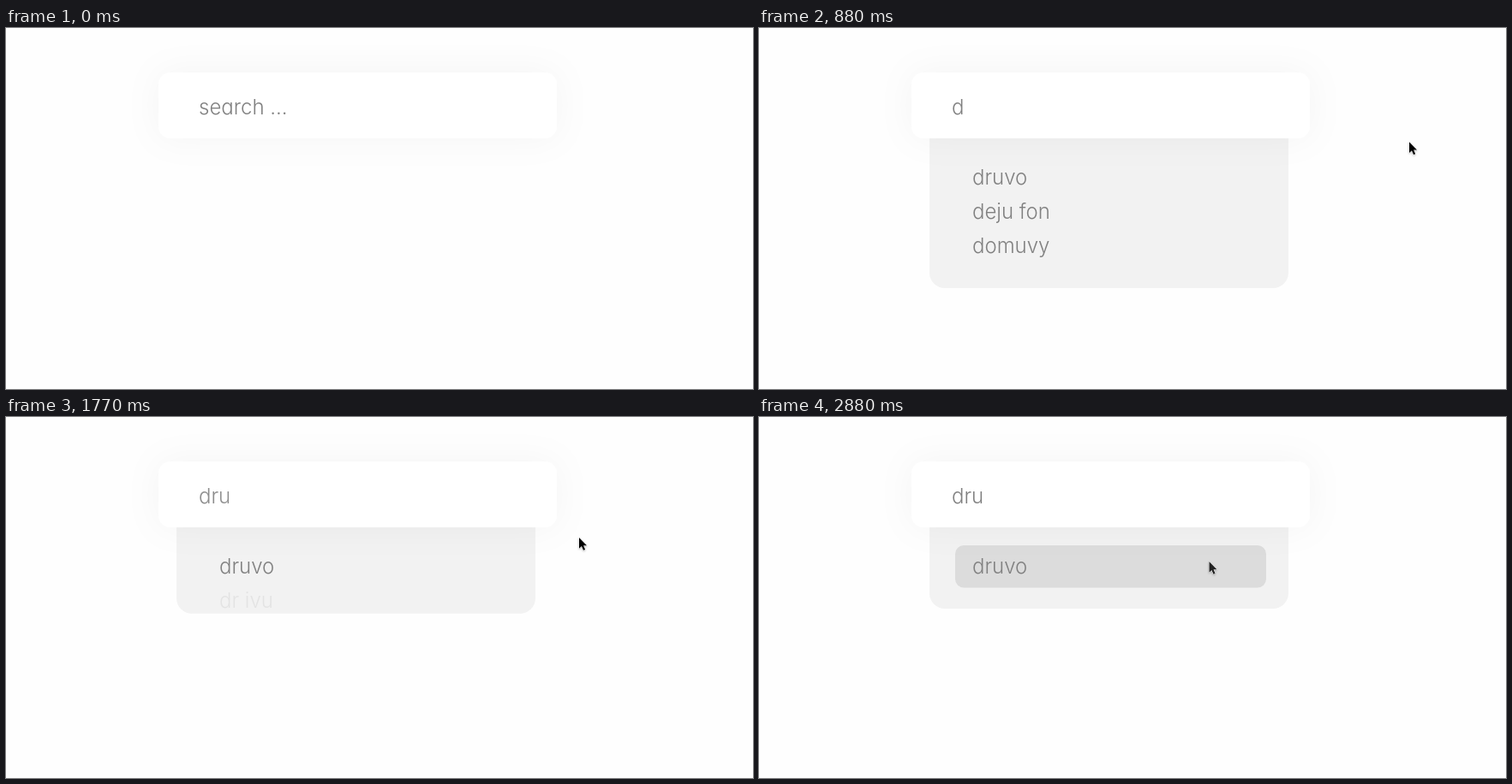
Animation, 872 px wide and 422 px high, one loop 4.01 s. Source, as an HTML page:

```html
<!DOCTYPE html>
<html lang="en">
<head>
<meta charset="utf-8">
<title>Search suggestions</title>
<style>
  html, body { margin: 0; width: 100%; height: 100%; overflow: hidden; background: #fefefe; }
  svg { display: block; }
  text {
    font: 300 24px Inter, "Open Sans", sans-serif;
    font-feature-settings: "cv11";
    fill: #808080;
    white-space: pre;
  }
  #box { filter: drop-shadow(0 0 20px rgba(0, 0, 0, .04)); }
  #cursor { filter: drop-shadow(0 1px 1px rgba(0, 0, 0, .25)); }
</style>
</head>
<body>
<svg width="872" height="422" viewBox="0 0 872 422">
  <rect id="panel" x="199" y="100" width="419" height="0" rx="18" fill="#f2f2f2"/>
  <rect id="hover" x="229" y="150" width="363" height="49.5" rx="10" fill="#dcdcdc"/>
  <rect id="box" x="178" y="52" width="465" height="77" rx="14" fill="#fff"/>
  <g id="labels"></g>
  <path id="cursor" d="M0 0V12.8L2.9 10L5 14.8L7.1 13.9L5.1 9.2H9Z"
        stroke="#fff" paint-order="stroke"/>
</svg>
<script>
const LOOP = 4010, TICK = 70, ROW = 40;
const SHOW = 200, PRESS = 2880;
const $ = id => document.getElementById(id);

// typed text, then its suggestions
const STAGES = [
  { at: -LOOP, lines: ["search ..."] },
  { at: 470, lines: ["d", "druvo", "deju fon", "domuvy"] },
  { at: 1220, lines: ["dr", "druvo", "dr ivu"] },
  { at: 1630, lines: ["dru", "druvo"] }
];

// the picture moves on in ticks within these bursts and rests between them
const BURSTS = [[470, 1020], [1220, 1360], [1630, 1770], [2240, 2670], [2810, PRESS]];

const GLIDES = [
  { from: 610, to: 1020, x: 669, y: 141 },
  { from: 2170, to: 2670, x: 528, y: 168 },
  { from: 2670, to: PRESS, x: 525.5, y: 169 }
];

const clamp = p => Math.max(0, Math.min(1, p));
const lerp = (a, b, p) => a + (b - a) * p;
const progress = (t, from, to) => clamp((t - from) / (to - from));
const smooth = p => p * p * (3 - 2 * p);
const ticks = (t, start) => t < start ? 0 : (t - start) / TICK + 1;

function fade(t, start) {
  const k = ticks(t, start);
  return k > 3.5 ? 1 : 1 - .5 ** k;
}

function heldTime(t) {
  const burst = BURSTS.findLast(b => b[0] <= t);
  if (!burst) return 0;
  const [start, end] = burst;
  if (t >= end) return end;
  const last = Math.round((end - start) / TICK) - 1;
  return start + TICK * Math.min(Math.floor((t - start) / TICK), last);
}

function addLabel(text, row, from) {
  const el = document.createElementNS("http://www.w3.org/2000/svg", "text");
  el.textContent = text;
  el.setAttribute("x", row ? 249 : 225);
  el.setAttribute("y", row ? 143 + ROW * row : 101);
  $("labels").append(el);
  return { el, text, from, to: LOOP };
}

// a line that stays the same keeps its label; others cross-fade
function buildLabels() {
  const all = [], current = [];
  for (const { at, lines } of STAGES) {
    for (let row = 0; row < 4; row++) {
      const old = current[row], text = lines[row];
      if (old && old.text === text) continue;
      if (old) old.to = at;
      current[row] = text && addLabel(text, row, at);
      if (text) all.push(current[row]);
    }
  }
  return all;
}

const labels = buildLabels();

function draw(time) {
  const t = heldTime(time);

  let rows = 0;
  for (const { at, lines } of STAGES)
    rows = lerp(rows, lines.length - 1, clamp(.285 * ticks(t, at)));
  $("panel").setAttribute("height", 84 + ROW * rows);
  $("panel").setAttribute("opacity", rows > 0 ? 1 : 0);
  $("hover").setAttribute("opacity", progress(t, 2530, PRESS) ** 2);

  for (const { el, from, to } of labels)
    el.setAttribute("opacity", fade(t, from) * (1 - fade(t, to)));

  let x = 856, y = 125;
  for (const g of GLIDES) {
    const p = smooth(progress(t, g.from, g.to));
    x = lerp(x, g.x, p);
    y = lerp(y, g.y, p);
  }
  const cursor = $("cursor");
  cursor.setAttribute("transform", `translate(${x} ${y})`);
  cursor.setAttribute("opacity", time < SHOW ? 0 : 1);
  cursor.setAttribute("fill", t < PRESS ? "#000" : "#222");
}

const begin = performance.now();
function loop() {
  draw((performance.now() - begin) % LOOP);
  requestAnimationFrame(loop);
}
loop();
</script>
</body>
</html>
```
